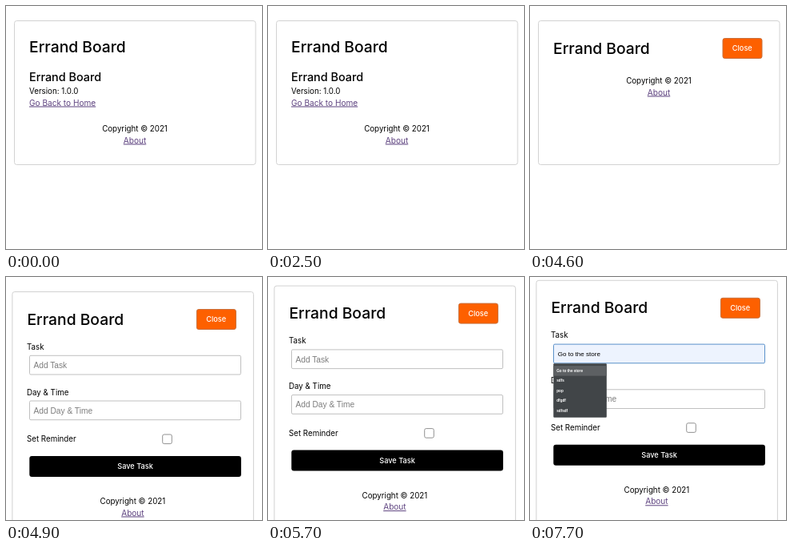
Recreate the animation shown at these times as an HTML page. Size 320 by 304 pixels, loop 8000 ms.

```html
<!DOCTYPE html>
<html lang="en">
<head>
<meta charset="utf-8">
<title>Errand Board</title>
<style>
  html, body { margin: 0; width: 100%; height: 100%; overflow: hidden; background: #fff; }
  svg { display: block; width: 100vw; height: 100vh; }
  text { font: 9.75px Inter, "Open Sans", sans-serif; fill: #000; white-space: pre; }
  .h1 { font-size: 19.3px; font-weight: 500; }
  .h2 { font-size: 14.4px; font-weight: 500; }
  .link { font-size: 10.1px; fill: #5f4480; text-decoration: underline; text-decoration-thickness: .7px; text-underline-offset: .6px; }
  .mid { text-anchor: middle; }
  .btn { font-size: 9.2px; font-weight: 500; fill: #fff; text-anchor: middle; }
  .hint { font: 10.2px "Liberation Sans", Arial, sans-serif; fill: #7d7d7d; }
  .value { font: 8.05px "Liberation Sans", Arial, sans-serif; }
  .item { font: bold 4.6px "Liberation Sans", Arial, sans-serif; fill: #fff; }
  .box { fill: #fff; stroke: #b9b9b9; stroke-width: .9; }
  .card { fill: #fff; stroke: #d2d2d2; stroke-width: 1; }
</style>
</head>
<body>
<svg viewBox="0 0 320 304">
  <g id="page">
    <rect id="card" class="card" x="10.5" y="18.5" width="301.5" height="180" rx="3"/>
    <text id="title" class="h1" x="29">Errand Board</text>

    <g id="about">
      <text class="h2" x="29" y="94">Errand Board</text>
      <text x="29" y="110">Version: 1.0.0</text>
      <text class="link" x="29" y="124.5">Go Back to Home</text>
    </g>

    <g id="close">
      <rect x="241" y="40.5" width="49" height="25" rx="2.5" fill="#fd6000" stroke="#c8703c"/>
      <text class="btn" x="265.3" y="56">Close</text>
    </g>

    <g id="form">
      <text x="26" y="90.7">Task</text>
      <rect id="task" class="box" x="29.5" y="98.3" width="264" height="23.7" rx="1.5"/>
      <text id="hint" class="hint" x="34.5" y="114">Add Task</text>
      <text id="value" class="value" x="34.7" y="113.5">Go to the store</text>
      <text x="26" y="147.7">Day &amp; Time</text>
      <rect class="box" x="29.5" y="155" width="264" height="23.7" rx="1.5"/>
      <text class="hint" x="34.5" y="170.7">Add Day &amp; Time</text>
      <text x="26" y="206.2">Set Reminder</text>
      <rect class="box" x="195.7" y="197" width="11.6" height="11.6" rx="2" style="stroke:#858585"/>
      <rect x="29.3" y="224" width="264.6" height="26" rx="3"/>
      <text class="btn" x="161.5" y="240.2">Save Task</text>
    </g>

    <g id="footer">
      <text class="mid" x="161" y="97.2">Copyright © 2021</text>
      <text class="mid link" x="161" y="111.5">About</text>
    </g>

    <g id="menu">
      <rect x="29.3" y="122.4" width="66.5" height="67.6" rx="1" fill="#414548"/>
      <rect id="hover" x="29.3" y="125.3" width="66.5" height="12.6" fill="#5d6063"/>
    </g>
  </g>
</svg>
<script>
const $ = id => document.getElementById(id);
const show = (id, on) => $(id).setAttribute("display", on ? "inline" : "none");
const set = (id, attrs) => Object.entries(attrs).forEach(([k, v]) => $(id).setAttribute(k, v));

["Go to the store", "sdfs", "pop", "dfgdf", "sdfsdf"].forEach((word, i) => {
  const t = document.createElementNS("http://www.w3.org/2000/svg", "text");
  t.setAttribute("class", "item");
  t.setAttribute("x", 33.3);
  t.setAttribute("y", 133.2 + i * 12.4);
  t.textContent = word;
  $("menu").append(t);
});

function draw(t) {
  const about = t < 1300 || (t >= 2500 && t < 3900);
  const form = t >= 4800;
  const pressed = t >= 4400 && t < 4600;
  const focus = t >= 7100;
  const filled = t >= 7600;
  const scroll = t < 5600 ? 0 : t < 5700 ? 3 : t < 5800 ? 7.4 : 14.2;
  const shift = form ? -2.6 : 0; // room taken by the scrollbar

  show("about", about);
  show("close", !about);
  show("form", form);
  show("menu", focus);
  show("hover", filled);
  show("hint", !filled);
  show("value", filled);

  set("page", { transform: `translate(0 ${-scroll})` });
  set("card", { x: 10.5 + shift, height: form ? 320 : 180 });
  set("title", { x: 29 + shift, y: about ? 58.3 : 59.7 });
  set("footer", { transform: `translate(${shift} ${about ? 60 : form ? 187 : 0})` });
  set("close", {
    transform: `translate(${shift} 0)` +
      (pressed ? " translate(265.5 53) scale(.98) translate(-265.5 -53)" : "")
  });
  $("task").style.cssText =
    (focus ? "stroke:#4a86c5;" : "") + (filled ? "fill:#edf3fe" : "");
}

const start = performance.now();
function tick() {
  draw((performance.now() - start) % 8000);
  requestAnimationFrame(tick);
}
tick();
</script>
</body>
</html>
```
